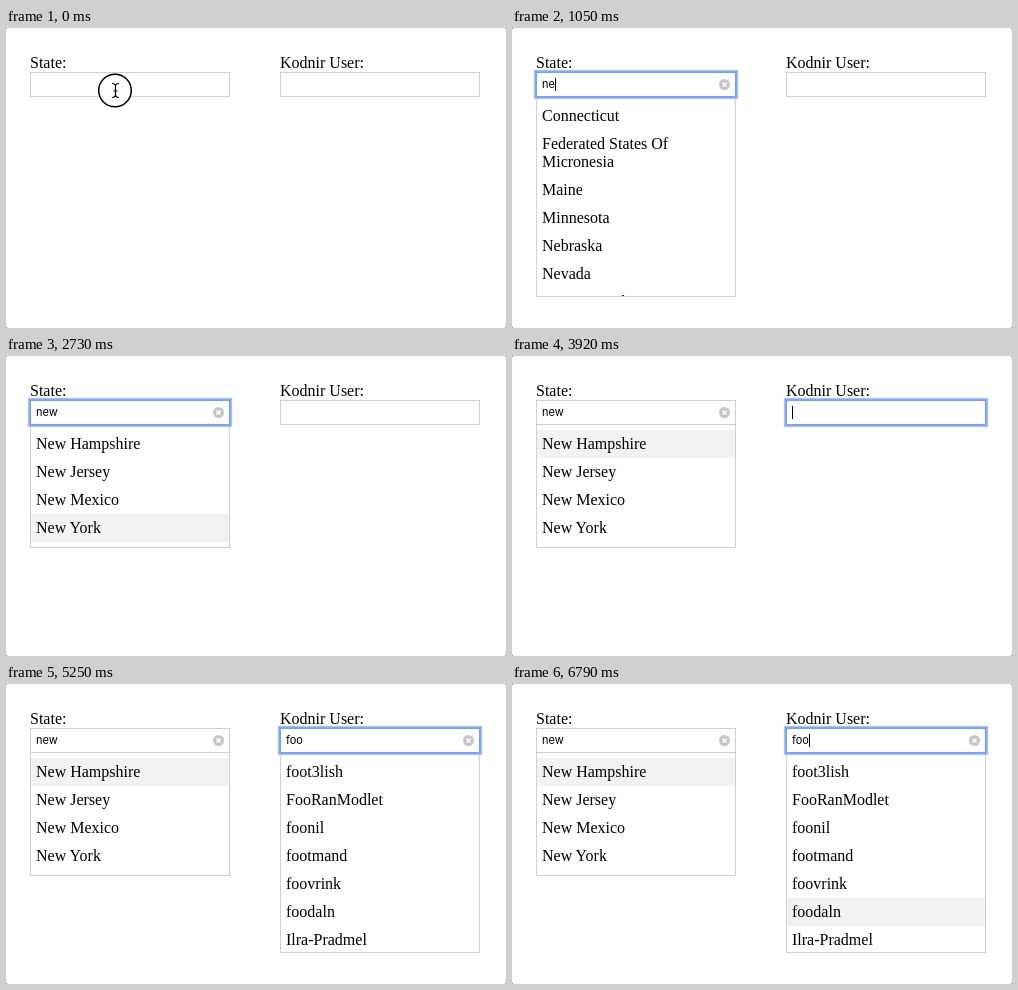
An HTML page that plays this animation: 500x300 px, repeating every 6.93 s.

```html
<!DOCTYPE html>
<html lang="en">
<head>
<meta charset="utf-8">
<title>Autocomplete</title>
<style>
html, body { margin: 0; width: 100%; height: 100%; overflow: hidden; background: #fff; }
body { position: relative; font: 16px/18px "Liberation Serif", serif; color: #000; }
.field { position: absolute; top: 26px; width: 200px; }
.field * { box-sizing: border-box; }
.box {
  position: relative; height: 25px; padding: 5px; border: 1px solid #d0d0d0;
  display: flex; align-items: center; font: 11px/13px Inter, sans-serif;
}
.box.focus {
  border-color: #7b9fe8;
  box-shadow: 0 0 0 1px #86a8ec, 0 0 1px 2px #a9c1f3, inset 0 0 1px 0 #a9c1f3;
}
.caret { width: 1px; height: 13px; background: #000; }
.box svg { position: absolute; right: 5px; top: 6px; }
.list { max-height: 200px; overflow: hidden; padding: 5px 0; border: 1px solid #d0d0d0; border-top: 0; }
.list div { padding: 5px; }
.list .on { background: #f2f2f2; }
#pointer { position: absolute; left: 91px; top: 44px; }
.corner { position: absolute; width: 1px; height: 1px; background: #888; }
</style>
</head>
<body>
<div class="field" style="left:24px"></div>
<div class="field" style="left:274px"></div>
<svg id="pointer" width="36" height="36" fill="none" stroke="#000">
  <circle cx="18" cy="18.5" r="16.3" fill="#fff" stroke-width="1.5"/>
  <path d="M15 11.5q3.5 0 3.5 3v8q0 3-3.5 3M22 11.5q-3.5 0-3.5 3v8q0 3 3.5 3M16.5 19h4" stroke-width="1.2"/>
</svg>
<i class="corner" style="left:0;top:0"></i>
<i class="corner" style="right:0;top:0"></i>
<i class="corner" style="left:0;bottom:0"></i>
<i class="corner" style="right:0;bottom:0"></i>
<script>
const LOOP = 6930;
const fields = document.querySelectorAll('.field');
const pointer = document.getElementById('pointer');

const micronesia = 'Federated States Of Micronesia';
const states = {
  n: ['American Samoa', 'Arizona', 'Arkansas', 'California', 'Connecticut', micronesia, 'Indiana'],
  ne: ['Connecticut', micronesia, 'Maine', 'Minnesota', 'Nebraska', 'Nevada', 'New Hampshire'],
  new: ['New Hampshire', 'New Jersey', 'New Mexico', 'New York']
};
const users = ['foot3lish', 'FooRanModlet', 'foonil', 'footmand', 'foovrink', 'foodaln', 'Ilra-Pradmel'];

// Number of listed moments already passed
const passed = (t, times) => times.filter(x => t >= x).length;

const typed1 = [840, 1050, 1120];
const typed2 = [4550, 4620, 4760];
const down1 = [1890, 2170, 2380, 2590], up1 = [3010, 3290, 3500];
const down2 = [5320, 5530, 5670, 5880, 6020, 6160];
const blinks = [70, 560, 840, 1680, 2170, 2730, 3290, 3780, 3920, 4410, 4550, 5250, 5740, 6300, 6790];

const clearIcon = `<svg width="11" height="11"><circle cx="5.5" cy="5.5" r="5.5" fill="#c6c6c6"/>
  <path d="M3.4 3.4l4.2 4.2m0-4.2l-4.2 4.2" stroke="#fff" stroke-width="1.4"/></svg>`;

function field(label, text, focus, caret, items, active) {
  const rows = items.map((s, i) => `<div class="${i === active ? 'on' : ''}">${s}</div>`).join('');
  return `${label}<div class="box ${focus ? 'focus' : ''}"><span>${text}</span>
    ${focus && caret ? '<i class="caret"></i>' : ''}${text ? clearIcon : ''}</div>
    ${rows && `<div class="list">${rows}</div>`}`;
}

function show(el, html) {
  if (el.shown !== html) el.innerHTML = el.shown = html;
}

function draw(now) {
  const t = now % LOOP;
  const caret = passed(t, blinks) % 2;
  const state = 'new'.slice(0, passed(t, typed1));
  const user = 'foo'.slice(0, passed(t, typed2));
  show(fields[0], field('State:', state, t >= 70 && t < 3920, caret,
    states[state] || [], passed(t, down1) - passed(t, up1) - 1));
  show(fields[1], field('Kodnir User:', user, t >= 3920, caret,
    t >= 4830 ? users : [], passed(t, down2) - 1));
  pointer.style.opacity = t < 70 ? 1 : t < 140 ? 0.5 : 0;
  requestAnimationFrame(draw);
}

const start = performance.now();
const tick = () => draw(Math.max(0, performance.now() - start));
draw = (paint => () => { paint(performance.now() - start); })(draw);
tick();
</script>
</body>
</html>
```
